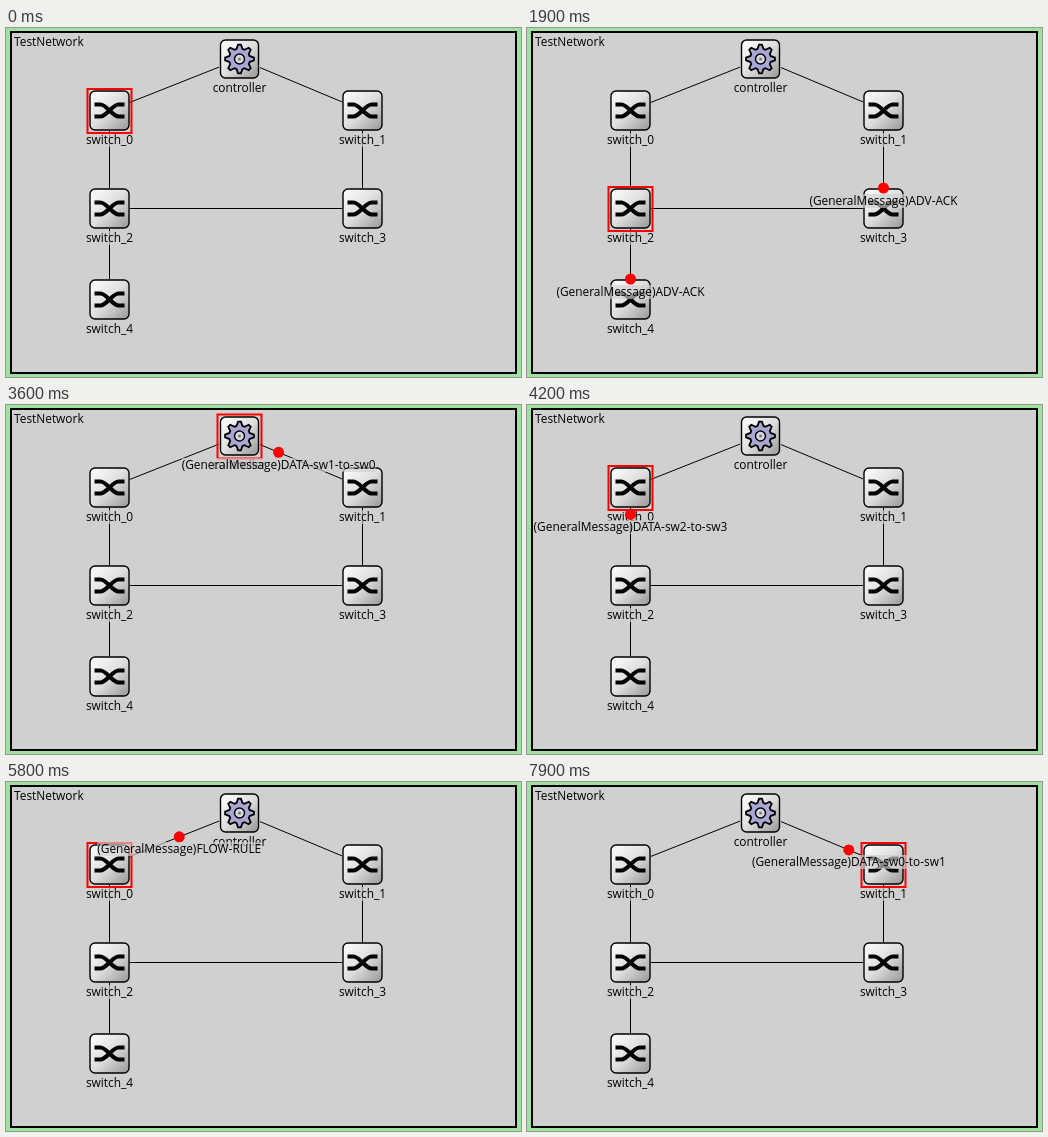
Animation of 515 by 349 pixels, one loop 8 s. Source, as an HTML page with a canvas:

```html
<!DOCTYPE html>
<html lang="en">
<head>
<meta charset="utf-8">
<title>Network messages</title>
<style>
  html, body { margin: 0; overflow: hidden; }
  canvas { display: block; }
</style>
</head>
<body>
<canvas id="stage" width="515" height="349"></canvas>
<script>
const ctx = document.getElementById('stage').getContext('2d');
const LOOP = 8000, TICK = 100, CTRL = 5;

const nodes = [
  [103.5, 82.5, 'switch_0'], [356.5, 82.5, 'switch_1'],
  [103.5, 180.5, 'switch_2'], [356.5, 180.5, 'switch_3'],
  [103.5, 271.5, 'switch_4'], [233.5, 31, 'controller']
];
const links = [[0, CTRL], [CTRL, 1], [0, 2], [1, 3], [2, 3], [2, 4]];

// first tick, selected node, message, progress at first tick, hops [from, to, fixed progress]
const steps = [
  [0, 0],
  [7, CTRL, 'ADV-ACK', .22, [CTRL, 0], [CTRL, 1]],
  [10, 2, 'ADV-ACK', .22, [0, 2], [1, 3]],
  [13, 2, 'ADV-ACK', .33, [2, 4], [1, 3, 1]],
  [20, 4, 'ADV-ACK', 1, [2, 4], [1, 3]],
  [21, 2, 'ADV-ACK', .22, [4, 2], [3, 1]],
  [24, CTRL, 'ADV-ACK', .3, [1, CTRL, .3]],
  [26, 4],
  [27, 2, 'DATA-sw4-to-sw0', .11, [4, 2]],
  [31, 0, 'DATA-sw4-to-sw0', .22, [2, 0]],
  [34, 1],
  [35, CTRL, 'DATA-sw1-to-sw0', .44, [1, CTRL]],
  [37, 0, 'DATA-sw1-to-sw0', .22, [CTRL, 0]],
  [40, 0, 'DATA-sw2-to-sw3', .22, [2, 0]],
  [43, CTRL, 'DATA-sw2-to-sw3', .11, [0, CTRL]],
  [47, 0, 'FLOW-RULE', -.22, [CTRL, 0]],
  [52, 2, 'FLOW-RULE', .11, [0, 2]],
  [56, 0, 'FLOW-RULE', -.22, [CTRL, 0]],
  [60, 2, 'FLOW-RULE', .22, [0, 2]],
  [63, 4, 'FLOW-RULE', .22, [2, 4]],
  [66, 0, 'FLOW-RULE', .11, [CTRL, 0]],
  [70, 2, 'FLOW-RULE', .22, [0, 2]],
  [73, CTRL, 'DATA-sw0-to-sw1', .11, [0, CTRL]],
  [77, 1, 'DATA-sw0-to-sw1', .16, [CTRL, 1]]
];

// Ends of the link, clipped to the icon borders
function ends(a, b) {
  const [ax, ay] = nodes[a], [bx, by] = nodes[b];
  const dx = bx - ax, dy = by - ay;
  const k = 20.5 / Math.max(Math.abs(dx), Math.abs(dy));
  return [ax + dx * k, ay + dy * k, bx - dx * k, by - dy * k];
}

function label(text, x, base) {
  const w = ctx.measureText(text).width;
  ctx.fillStyle = 'rgba(208,208,208,.65)';
  ctx.fillRect(x - w / 2, base - 11, w, 14);
  ctx.fillStyle = '#000';
  ctx.fillText(text, x, base);
}

function disc(x, y, r, fill) {
  ctx.beginPath();
  ctx.arc(x, y, r, 0, 7);
  ctx.fillStyle = fill;
  ctx.fill();
}

function cross() {
  ctx.lineWidth = 4;
  ctx.beginPath();
  for (const s of [1, -1]) {
    ctx.moveTo(-15, -6 * s);
    ctx.lineTo(-9, -6 * s);
    ctx.bezierCurveTo(-3, -6 * s, 3, 6 * s, 9, 6 * s);
    ctx.lineTo(15, 6 * s);
  }
  ctx.stroke();
}

function gear() {
  ctx.beginPath();
  for (let i = 0; i < 32; i++) {
    const r = i % 4 < 2 ? 14.5 : 10.5;
    const a = (i - .5) * Math.PI / 16;
    ctx.lineTo(r * Math.cos(a), r * Math.sin(a));
  }
  ctx.closePath();
  ctx.lineWidth = 1.8;
  ctx.fillStyle = '#a8a8d4';
  ctx.fill();
  ctx.stroke();
  disc(0, 0, 5, '#d8d8e0');
  ctx.lineWidth = 1.5;
  ctx.stroke();
  disc(0, 0, 1.5, '#777');
}

function drawNode([x, y, name], i) {
  const h = i === CTRL ? 19 : 19.5;
  const shade = ctx.createLinearGradient(-h, -h, h, h);
  shade.addColorStop(0, '#fff');
  shade.addColorStop(.5, '#dedede');
  shade.addColorStop(1, '#979797');
  ctx.save();
  ctx.translate(x, y);
  ctx.beginPath();
  ctx.roundRect(-h, -h, 2 * h, 2 * h, 5);
  ctx.fillStyle = shade;
  ctx.fill();
  ctx.strokeStyle = '#000';
  ctx.lineWidth = 1.4;
  ctx.stroke();
  i === CTRL ? gear() : cross();
  ctx.restore();
  label(name, x, Math.round(y + 33));
}

function drawScene(tick) {
  const [first, selected, message, start, ...hops] = steps.findLast(s => s[0] <= tick);

  ctx.fillStyle = '#9fe29f';
  ctx.fillRect(0, 0, 515, 349);
  ctx.fillStyle = '#d0d0d0';
  ctx.fillRect(5, 4, 505, 341);
  ctx.strokeStyle = '#000';
  ctx.lineWidth = 2;
  ctx.strokeRect(5, 4, 505, 341);

  ctx.font = '11.9px "Open Sans", "Noto Sans", sans-serif';
  ctx.textAlign = 'left';
  ctx.fillStyle = '#000';
  ctx.fillText('TestNetwork', 8, 18);
  ctx.textAlign = 'center';

  ctx.lineWidth = 1;
  ctx.beginPath();
  for (const [a, b] of links) {
    const [x1, y1, x2, y2] = ends(a, b);
    ctx.moveTo(x1, y1);
    ctx.lineTo(x2, y2);
  }
  ctx.stroke();
  nodes.forEach(drawNode);

  const [sx, sy] = nodes[selected];
  ctx.strokeStyle = '#f00';
  ctx.lineWidth = 2;
  ctx.strokeRect(sx - 22, sy - 21.5, 44, 44);

  const moved = Math.max(0, Math.min(1, start + (tick - first) / 3));
  for (const [a, b, p = moved] of hops) {
    const [x1, y1, x2, y2] = ends(a, b);
    const x = x1 + (x2 - x1) * p, y = y1 + (y2 - y1) * p;
    label('(GeneralMessage)' + message, x, Math.round(y + 16.5));
    disc(x, y, 5.5, '#f00');
  }
}

function frame(now) {
  drawScene(Math.floor(now % LOOP / TICK));
  requestAnimationFrame(frame);
}
requestAnimationFrame(frame);
</script>
</body>
</html>
```
